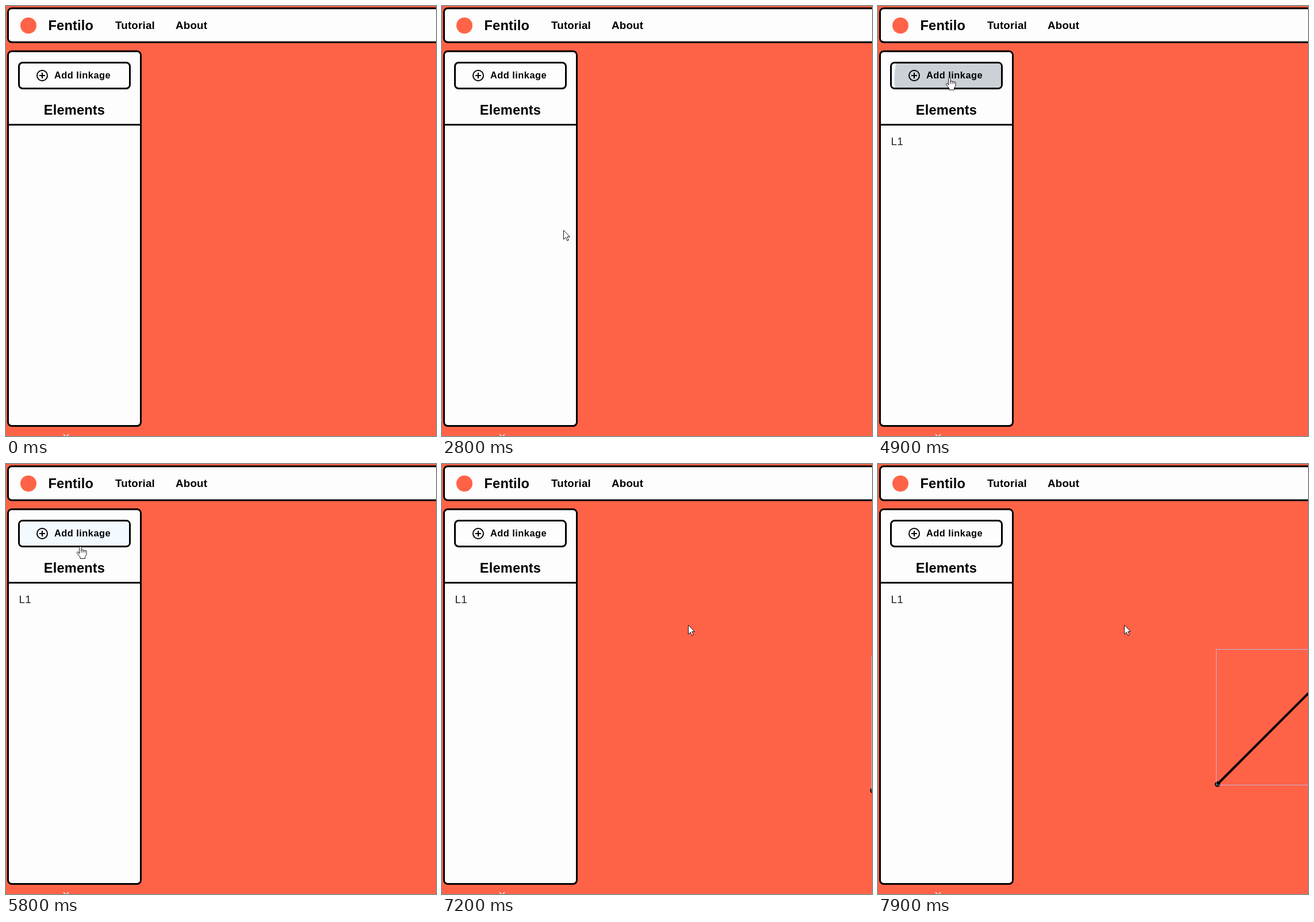
Animation, 748 px wide and 748 px high, one loop 8000 ms. Source, as an HTML page:

```html
<!DOCTYPE html>
<html lang="en">
<head>
<meta charset="utf-8">
<title>Linkage editor</title>
<style>
  html, body { margin: 0; width: 100%; height: 100%; overflow: hidden; background: #ff6347; }
  svg { display: block; width: 100%; height: 100%; }
  text { font: bold 23.6px "Liberation Sans", Arial, sans-serif; letter-spacing: .18px; }
  .menu { font-size: 18.8px; }
  .label { font-size: 16.4px; letter-spacing: .47px; }
  .item { font-size: 18.8px; font-weight: normal; fill: #222230; }
  .card { fill: #fdfdfd; stroke: #000; stroke-width: 3; }
  .line { fill: none; stroke: #000; stroke-width: 2; }
  .pointer { fill: #fff; stroke: #15101c; stroke-width: 1; stroke-linejoin: round; }
</style>
</head>
<body>
<svg viewBox="0 0 748 748">
  <clipPath id="inside"><rect x="24" y="100" width="190" height="42" rx="5"/></clipPath>

  <rect class="card" x="3.5" y="4" width="800" height="59" rx="6.5"/>
  <circle cx="39" cy="34" r="14" fill="#ff6347"/>
  <text x="73.5" y="42">Fentilo</text>
  <text class="menu" x="190" y="40">Tutorial</text>
  <text class="menu" x="295" y="40">About</text>

  <rect class="card" x="3.5" y="78.8" width="231" height="651.7" rx="6.5"/>
  <rect class="card" x="22.5" y="98.5" width="193" height="45" rx="6.5"/>
  <g clip-path="url(#inside)">
    <rect id="hover" x="24" y="100" width="190" height="42" fill="#f2f9ff"/>
    <circle id="ripple" cx="126" cy="126"/>
  </g>
  <circle class="line" cx="63" cy="121" r="9"/>
  <path class="line" d="M58 121h10M63 116v10"/>
  <text class="label" x="84" y="126">Add linkage</text>
  <text x="65.8" y="189">Elements</text>
  <path class="line" d="M4 206.5H234" style="stroke-width:3px"/>
  <rect id="row" x="7" y="212" width="225" height="48" fill="#f2f9ff"/>
  <text id="item" class="item" x="22.6" y="242">L1</text>
  <path d="M100 745l9 9M109 745l-9 9" stroke="#fff" stroke-width="1.5"/>

  <g id="link">
    <path d="M2 234.5L236 .5" stroke="#000" stroke-width="4"/>
    <circle cx="2" cy="234.5" r="4.7"/>
    <rect width="236" height="236" fill="none" stroke="#b2ccff" stroke-opacity=".8"/>
  </g>

  <path id="arrow" class="pointer" d="M0 0V16L3.7 12.6 6.3 18.3 8.8 17.2 6.3 11.6H11Z"/>
  <path id="hand" class="pointer" d="M-2 13V2a1.7 1.7 0 0 1 3.4 0V7.5a1.6 1.6 0 0 1 3.2.3a1.6 1.6 0 0 1 3.1.6a1.4 1.4 0 0 1 2.8.8V14.5L8 18.5V21.5H-.5V19L-5.7 12.5C-7 10.5-5 9-3.6 10.5ZM1.4 7.5V11M4.6 8V11M7.7 8.6V11"/>
</svg>
<script>
const LOOP = 8000, STEP = 100;
const $ = id => document.getElementById(id);
const ramp = (t, a, b) => Math.min(1, Math.max(0, (t - a) / (b - a)));
const smooth = u => u * u * (3 - 2 * u);
const linear = u => u;
const show = (id, on) => $(id).style.display = on ? '' : 'none';
const place = (id, [x, y]) => $(id).setAttribute('transform', `translate(${x} ${y})`);

// Each key: time, x, y, easing towards it
const pointerPath = [
  [1800, 325, 752],
  [2700, 211.5, 390, smooth],
  [3100, 211.5, 390],
  [4000, 124.5, 124.5, smooth],
  [5400, 124.5, 124.5],
  [5800, 129.5, 143],
  [6000, 150, 180],
  [6300, 320, 253],
  [6400, 390, 272],
  [6500, 428.5, 280]
];
const linkPath = [
  [7100, 780, 332],
  [7200, 747.5, 333.5],
  [7300, 720.5, 335.5],
  [7600, 634.5, 328.5],
  [7800, 594.5, 319.5],
  [7900, 588.5, 322.5]
];

function along(path, t) {
  const i = path.findIndex(key => key[0] > t);
  if (i < 0) return path.at(-1).slice(1, 3);
  if (!i) return path[0].slice(1, 3);
  const [ta, xa, ya] = path[i - 1], [tb, xb, yb, ease = linear] = path[i];
  const u = ease(ramp(t, ta, tb));
  return [xa + (xb - xa) * u, ya + (yb - ya) * u];
}

function draw(t) {
  const tip = along(pointerPath, t), [x, y] = tip;
  const overRow = t > 5400 && x < 232 && y > 212 && y < 260;
  const hand = x < 232 && y < 145 || overRow;
  place('arrow', tip);
  place('hand', tip);
  show('arrow', t >= 1900 && !hand);
  show('hand', hand);

  $('hover').style.opacity = ramp(t, 3800, 4100) - ramp(t, 5800, 6100);
  const grow = 1 - (1 - ramp(t, 4550, 5100)) ** 2.4;
  $('ripple').setAttribute('r', 107 * grow);
  $('ripple').style.opacity = .165 * (1 - smooth(ramp(t, 4850, 5400)));

  show('row', overRow);
  show('item', t >= 4850);
  place('link', along(linkPath, t));
  show('link', t >= 7200);
}

function frame(now) {
  draw(Math.floor(now % LOOP / STEP) * STEP);
  requestAnimationFrame(frame);
}
draw(0);
requestAnimationFrame(frame);
</script>
</body>
</html>
```
